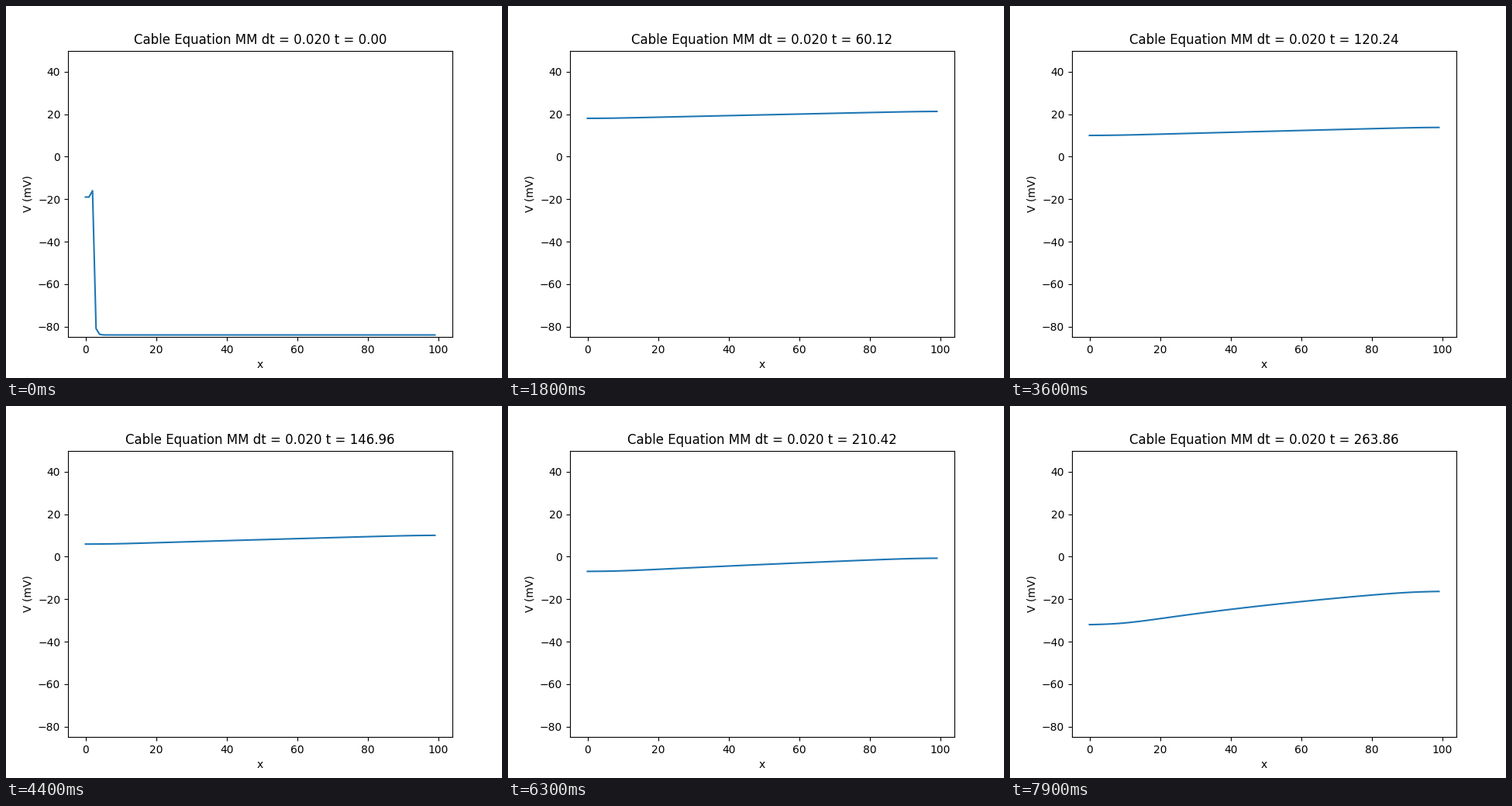
A matplotlib script that plays this animation: 640x480 px, repeating every 8 s.

```python
import numpy as np
import matplotlib.pyplot as plt
from matplotlib.animation import FuncAnimation

CELLS = 100
FRAMES = 80
DT = 0.02
STEP = 3.34          # simulated ms per frame
T_END = STEP * (FRAMES - 1)
REST = -84.0
SPEED = 3.47         # wavefront, cells per ms

x = np.arange(CELLS)


def logistic(z):
    return 1 / (1 + np.exp(-z))


def plateau(s):
    """Slow decay of one cell, s ms after activation, steepening late."""
    s = np.maximum(s, 0)
    return 30.76 - 0.0981 * s - 1690 / (309.7 - s) - 0.8 * np.exp(-s / 12)


def delay(t):
    """Activation delay in ms along the cable, flat at the sealed ends."""
    p = t / T_END
    left, right = 4 + 5 * p, CELLS - 4 - 3 * p
    width = 2.5 + 1.5 * p
    g = width * (np.logaddexp(0, (x - left) / width)
                 - np.logaddexp(0, (x - right) / width))
    lag = 27 - 1.6 * p ** 6
    return lag * (g - g[0]) / (g[-1] - g[0])


def stimulus():
    """Three excited cells, the rest decaying quickly to rest."""
    v = REST + 3 * 10.0 ** (3 - x)
    v[:3] = -19, -19, -16
    return v


def voltage(t):
    if t == 0:
        return stimulus()
    front = 79.98 + SPEED * (t - 7 * STEP)
    peak = 21.5 * logistic((np.hypot(x, 3) - front + 10.73) / 4.7)
    body = plateau(t - delay(t)) + peak
    upstroke = logistic(3.85 * np.arcsinh((front - x) / 2))
    return REST + (body - REST) * upstroke


fig, ax = plt.subplots(figsize=(6.4, 4.8), dpi=100)
line, = ax.plot(x, voltage(0))
ax.set_ylim(-85, 50)
ax.set_xlabel("x")
ax.set_ylabel("V (mV)")
title = ax.set_title("")


def update(frame):
    t = frame * STEP
    line.set_ydata(voltage(t))
    title.set_text(f"Cable Equation MM dt = {DT:.3f} t = {t:.2f}")
    return line, title


anim = FuncAnimation(fig, update, frames=FRAMES, interval=100,
                     repeat=True, repeat_delay=0, blit=False)
plt.show()
```
